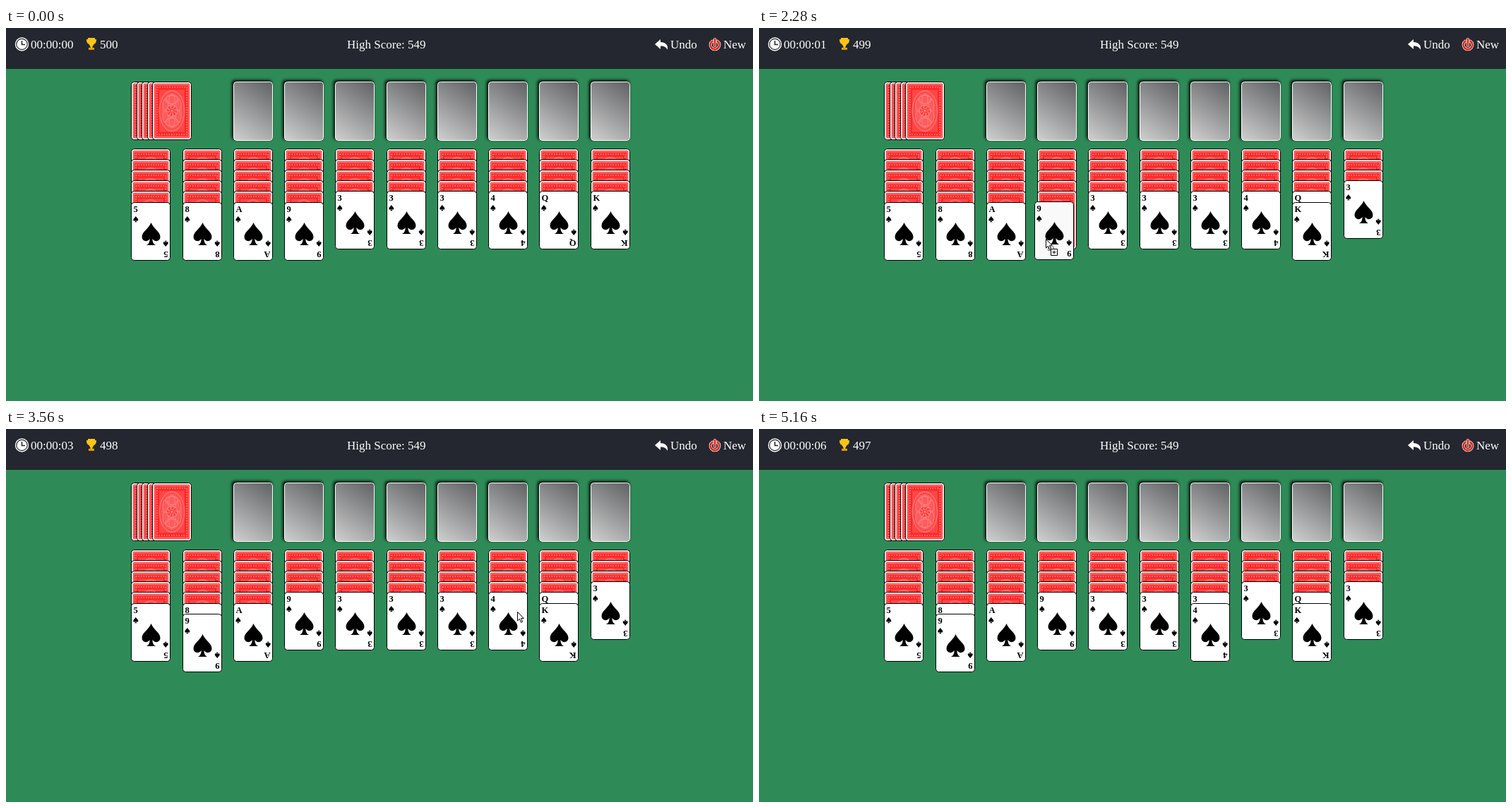
These frames come from a looping animation (1058x529 px, 5.18 s). An HTML page with a canvas:

```html
<!DOCTYPE html>
<html>
<head>
<meta charset="utf-8">
<title>Solitaire</title>
<style>
html, body { margin: 0; height: 100%; overflow: hidden; background: #2e8b57; }
canvas { display: block; }
</style>
</head>
<body>
<canvas id="stage" width="1058" height="529"></canvas>
<script>
const LOOP = 5180, W = 55, H = 82;
const ctx = document.getElementById('stage').getContext('2d');
const SERIF = '"Liberation Serif", "Times New Roman", serif';

const spade = new Path2D('M0-16C3-8 13.5-3 13.5 4C13.5 11 5 12 2 7C2 12 4 15 7 16H-7C-4 15-2 12-2 7C-5 12-13.5 11-13.5 4C-13.5-3-3-8 0-16Z');
const arrow = new Path2D('M.5.5V13L3.4 10.3L5.5 15.3L7.6 14.4L5.5 9.6H9.3Z');
const undo = new Path2D('M919 23L927 16V20C934 20 938 24 937 31C935 27 932 25.5 927 25.5V30Z');
const cup = new Path2D('M116 14H126V16H128C128 20 127 22 124.5 23C123.5 25 122.5 25 122.3 28H125V31H117V28H119.7C119.5 25 118.5 25 117.5 23C115 22 114 20 114 16H116Z');

// Pointer keys: time, x, y; a fourth value eases the way to that key.
const pointer = [
  [560, 1040, 64], [1080, 849, 276, 1], [1100, 849, 276], [1220, 826, 296],
  [1380, 786, 306], [1500, 772, 302], [1720, 772, 302], [2140, 410, 299, 1],
  [2260, 410, 299], [2280, 406, 299], [2420, 348, 312], [2580, 292, 314],
  [2740, 271, 312], [2840, 271, 312], [3360, 737, 257, 1], [3400, 737, 257],
  [3540, 724, 259], [3600, 724, 259], [3760, 678, 296], [3920, 648, 290],
  [3980, 647, 288], [4100, 649, 284], [4520, 649, 284], [5040, 1042, 40, 1]
];
// off: card corner to pointer, at the start and at the end of each drag
const moves = [
  { grab: 1100, drop: 1500, from: 9, to: 8, off: [21, 44, 21, 44], next: '3' },
  { grab: 2260, drop: 2740, from: 3, to: 1, off: [15, 52, 24, 48], next: '9' },
  { grab: 3600, drop: 4100, from: 7, to: 6, off: [41, 27, 41, 27], next: '3' }
];
const ticks = [1960, 2660, 3200, 3760, 4100, 5100];

const mix = (a, b, p) => a + (b - a) * p;

function pointerAt(t) {
  const i = pointer.findIndex(k => k[0] > t);
  if (i === 0) return pointer[0].slice(1, 3);
  if (i < 0) return pointer.at(-1).slice(1, 3);
  const a = pointer[i - 1], b = pointer[i];
  let p = (t - a[0]) / (b[0] - a[0]);
  if (b[3]) p = p * p * (3 - 2 * p);
  return [Math.round(mix(a[1], b[1], p)), Math.round(mix(a[2], b[2], p))];
}

function at(x, y, draw) {
  ctx.save();
  ctx.translate(x, y);
  draw();
  ctx.restore();
}

function box(x, y, w, h, r, fill, line) {
  ctx.beginPath();
  ctx.roundRect(x, y, w, h, r);
  if (fill) { ctx.fillStyle = fill; ctx.fill(); }
  if (line) { ctx.strokeStyle = line; ctx.stroke(); }
}

function oval(rx, ry, line, fill) {
  ctx.beginPath();
  ctx.ellipse(0, 0, rx, ry, 0, 0, 7);
  if (fill) { ctx.fillStyle = fill; ctx.fill(); }
  if (line) { ctx.strokeStyle = line; ctx.stroke(); }
}

function text(s, x, y) {
  ctx.font = '17px ' + SERIF;
  ctx.fillStyle = '#fff';
  ctx.fillText(s, x, y);
}

function back(x, y) {
  at(x, y, () => {
    ctx.lineWidth = 1;
    box(0, 0, W, H, 4, '#fff', '#000');
    box(2, 2, W - 4, H - 4, 2, '#ff6262');
    box(4.5, 5, W - 9, H - 10, 0, '#ff2a2a', '#ff4848');
    ctx.setLineDash([1.5, 2]);
    ctx.lineWidth = 1.5;
    box(6.5, 7.5, W - 13, H - 15, 0, null, '#ff8c8c');
    ctx.setLineDash([]);
    ctx.lineWidth = 1;
    box(9, 10.5, W - 18, H - 21, 0, '#ff4646', '#ff2020');
    ctx.translate(W / 2, H / 2);
    oval(18, 29, '#ff7c7c', '#ff5a5a');
    oval(15.5, 26, '#ff3a3a');
    for (const sy of [-1, 1]) {
      at(0, sy * 16, () => { oval(9, 6, '#ff9090'); oval(4, 8, '#ff8080'); });
      for (const sx of [-1, 1]) at(sx * 9, sy * 8, () => oval(4, 9, '#ff8080'));
    }
    oval(8, 8, '#ff9494', '#ff4040');
    // pinwheel
    for (let i = 0; i < 8; i++) {
      ctx.rotate(Math.PI / 4);
      ctx.stroke(new Path2D('M0 2Q3 4 1 8'));
    }
    oval(2, 2, '#ff2020', '#ff9a9a');
  });
}

function corner(rank) {
  ctx.font = 'bold 12.5px ' + SERIF;
  ctx.fillText(rank, 3, 13);
  at(6.3, 23.5, () => { ctx.scale(.26, .26); ctx.fill(spade); });
}

function face(rank, x, y, fill = '#fff') {
  at(x, y, () => {
    ctx.lineWidth = 1;
    box(0, 0, W, H, 4, fill, '#000');
    ctx.fillStyle = '#000';
    corner(rank);
    at(28, 44.5, () => { ctx.scale(.96, 1); ctx.fill(spade); });
    ctx.translate(W, H);
    ctx.rotate(Math.PI);
    corner(rank);
  });
}

const colX = i => Math.floor(177.75 + 72.25 * i) + .5;
const rowY = j => 171.5 + Math.round(15.1 * j);

function slot(x) {
  at(x, 76.5, () => {
    const g = ctx.createLinearGradient(0, H, W, 0);
    g.addColorStop(0, '#cfcfcf');
    g.addColorStop(1, '#606164');
    ctx.save();
    ctx.shadowColor = '#000';
    ctx.shadowBlur = 4;
    ctx.shadowOffsetX = ctx.shadowOffsetY = -2;
    box(-.5, -.5, W + 1, H + 2, 4, '#000');
    ctx.restore();
    ctx.lineWidth = 1;
    box(0, 0, W, H + 1, 4, g, '#fff');
  });
}

function header(t, score) {
  ctx.fillStyle = '#24272f';
  ctx.fillRect(0, 0, 1058, 58);
  at(22.5, 23, () => {
    oval(9.7, 9.7, null, '#fff');
    ctx.lineWidth = 1.2;
    oval(7.7, 7.7, '#24272f');
    ctx.lineWidth = 1.6;
    ctx.stroke(new Path2D('M0-5V.5H4.5'));
  });
  ctx.fillStyle = '#fdc414';
  ctx.fill(cup);
  ctx.fillStyle = '#d99a06';
  ctx.fillRect(117, 28.5, 8, 2.5);
  ctx.fillStyle = '#fff';
  ctx.fill(undo);
  at(1004, 24, () => {
    const sign = new Path2D('M-3.5-5.3A6.3 6.3 0 1 0 3.5-5.3M0-8V1');
    ctx.lineCap = 'round';
    for (const [w, c] of [[4.2, '#fff'], [2.8, '#e0281c']]) {
      ctx.lineWidth = w;
      ctx.strokeStyle = c;
      ctx.stroke(sign);
    }
  });
  text('00:00:0' + ticks.filter(k => t >= k).length, 35, 29);
  text(score, 133, 29);
  text('High Score: 549', 483, 29);
  text('Undo', 941, 29);
  text('New', 1016, 29);
}

function cursor(x, y, dragging) {
  at(x, y, () => {
    ctx.lineWidth = 1;
    if (dragging) {
      ctx.setLineDash([1, 1]);
      box(3.5, 11.5, 8, 5, 0, '#fff', '#000');
      ctx.setLineDash([]);
    }
    ctx.fillStyle = '#fff';
    ctx.fill(arrow);
    ctx.strokeStyle = '#000';
    ctx.stroke(arrow);
    if (dragging) {
      box(7.5, 14.5, 9, 9, 0, '#fff', '#000');
      ctx.stroke(new Path2D('M12 16.5V21.5M9.5 19H14.5'));
    }
  });
}

function draw(t) {
  const cols = [...'58A93334QK'].map((r, i) => ({ backs: i < 4 ? 5 : 4, faces: [r] }));
  const [mx, my] = pointerAt(t);
  let score = 500, held = null;
  for (const m of moves) {
    if (t < m.grab) break;
    const from = cols[m.from], rank = from.faces.pop();
    if (t < m.drop) {
      const p = (t - m.grab) / (m.drop - m.grab), [ax, ay, bx, by] = m.off;
      held = [rank, mx - Math.round(mix(ax, bx, p)) - .5, my - Math.round(mix(ay, by, p)) - .5];
    } else {
      cols[m.to].faces.push(rank);
      from.backs--;
      from.faces.push(m.next);
      score--;
    }
  }

  ctx.fillStyle = '#2e8b57';
  ctx.fillRect(0, 0, 1058, 529);
  header(t, score);
  for (let i = 0; i < 5; i++) back(177.5 + Math.round(7.5 * i), 76.5);
  for (let i = 2; i < 10; i++) slot(colX(i));
  cols.forEach((c, i) => {
    for (let j = 0; j < c.backs; j++) back(colX(i), rowY(j));
    c.faces.forEach((r, j) => face(r, colX(i), rowY(c.backs + j)));
  });
  if (held) face(...held, '#f9f9f9');
  if (t >= 100 && t < 5080) cursor(mx, my, held);
}

const start = performance.now();
function frame() {
  draw((performance.now() - start) % LOOP);
  requestAnimationFrame(frame);
}
frame();
</script>
</body>
</html>
```
